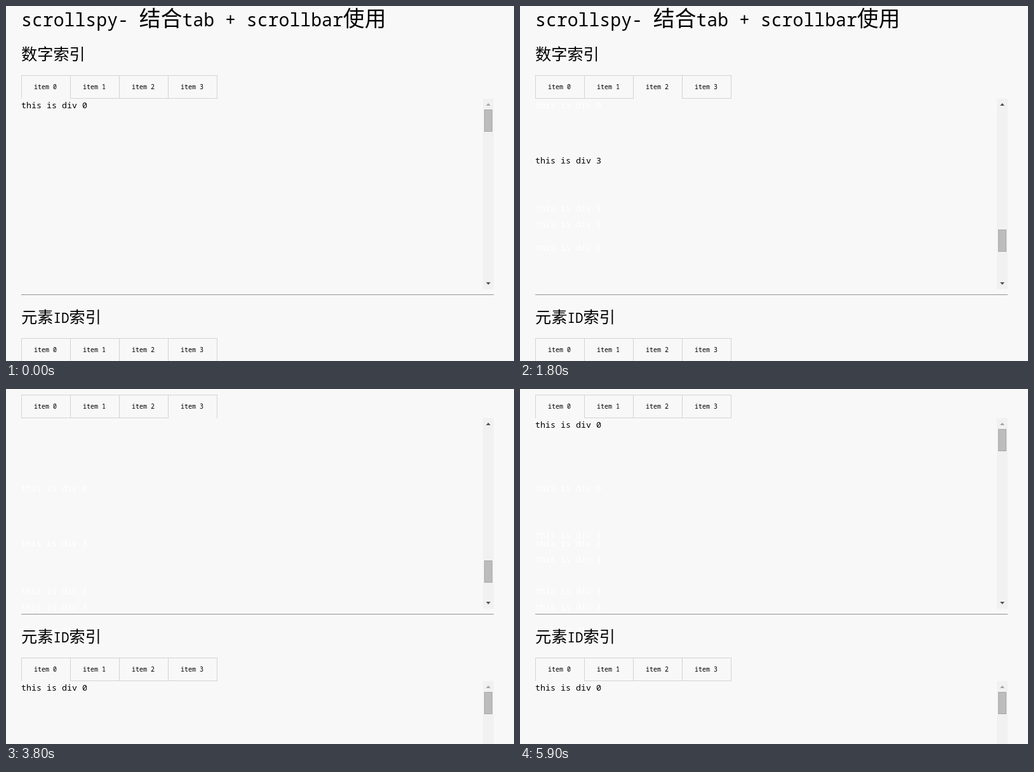
Recreate the animation shown at these times as an HTML page. Size 800 by 559 pixels, loop 8 s.

```html
<!DOCTYPE html>
<html lang="zh-CN">
<head>
<meta charset="utf-8">
<style>
  html, body { margin: 0; width: 100%; height: 100%; overflow: hidden; background: #f8f8f8; }
  svg { display: block; width: 800px; height: 559px; }
  text { white-space: pre; font-family: "Noto Sans Mono", "Liberation Mono", monospace; }
  .cjk { font-family: "Noto Sans CJK SC", "Noto Sans CJK", sans-serif; }
</style>
</head>
<body>
<svg id="stage" viewBox="0 0 800 559">
  <defs><clipPath id="view"><rect x="24" y="146" width="727" height="300"/></clipPath></defs>
</svg>
<script>
const LOOP = 8000;
const ITEM = 562.4;       // height of one scrolled div
const MAX_SCROLL = 1950;
const VIEW_HEIGHT = 300;
const THUMB_TRAVEL = 231;
const TEXT_BASE = 161;    // baseline of the first div when unscrolled
const BG = '#f8f8f8', BORDER = '#d3d3d3';
const items = [0, 1, 2, 3];

const stage = document.getElementById('stage');
const divTop = (i, scroll) => Math.floor(i * ITEM) - scroll;

// Scrolling: each wheel move adds a state; travel past the end moves the page.
const states = [{ time: 0, scroll: 0, page: 0 }];

function wheel(time, distance) {
  const last = states[states.length - 1];
  const wanted = last.scroll + distance;
  const scroll = Math.max(0, Math.min(MAX_SCROLL, wanted));
  states.push({ time, scroll, page: last.page + Math.max(0, wanted - scroll) });
}

// A flick is drawn in two steps, the first one a whole number of notches.
function flick(time, distance) {
  const first = 100 * Math.round(distance / 200);
  wheel(time, first);
  wheel(time + 100, distance - first);
}

for (let i = 0; i < 3; i++) flick(800 + 300 * i, 400 + 100 * i);
flick(1700, 100);
wheel(2200, 200);
flick(2500, 250);
wheel(3800, -200);
for (let i = 0; i < 4; i++) wheel(4200 + 300 * i, 100 * Math.floor(i / 2) - 400);
flick(5400, -200);
flick(5800, -150);

function add(parent, tag, attrs, content) {
  const node = document.createElementNS('http://www.w3.org/2000/svg', tag);
  for (const key in attrs) node.setAttribute(key, attrs[key]);
  if (content) node.textContent = content;
  return parent.appendChild(node);
}

function rect(parent, x, y, width, height, fill) {
  return add(parent, 'rect', { x, y, width, height, fill });
}

// Latin glyphs advance half an em of the CJK size: 0.6 * (size / 1.2).
function label(parent, x, y, size, content, attrs) {
  const node = add(parent, 'text', { x, y, ...attrs });
  for (const run of content.match(/[\u4e00-\u9fff]+|[^\u4e00-\u9fff]+/g)) {
    const cjk = run.charCodeAt(0) > 0x4dff;
    add(node, 'tspan', cjk
      ? { class: 'cjk', 'font-size': size }
      : { 'font-size': size / 1.2 }, run);
  }
  return node;
}

const divLabel = (parent, i, y, fill) =>
  label(parent, 24, y, 16, 'this is div ' + i, { fill });

function section(parent, top, title) {
  const g = add(parent, 'g', { transform: `translate(0 ${top})` });
  label(g, 24, 85, 25.2, title, { 'font-weight': 500 });

  for (const y of [109, 145]) rect(g, 24, y, 309, 1, BORDER);
  const gap = rect(g, 25, 145, 76, 1, BG);
  for (let i = 0; i < 5; i++) rect(g, 24 + 77 * i, 109, 1, 37, BORDER);
  for (const i of items) label(g, 44 + 77 * i, 131, 12, 'item ' + i);

  const view = add(g, 'g', { 'clip-path': 'url(#view)' });
  const divs = items.map(i => divLabel(view, i, TEXT_BASE, '#000'));

  rect(g, 751, 146, 17, VIEW_HEIGHT, '#f1f1f1');
  const up = add(g, 'path', { d: 'M756 157h7l-3.5 -4z' });
  const down = add(g, 'path', { d: 'M756 435h7l-3.5 4z' });
  const thumb = add(g, 'rect', {
    x: 753.5, y: 163.5, width: 12, height: 34, fill: '#bcbcbc', stroke: '#a8a8a8'
  });

  return scroll => {
    gap.setAttribute('x', 25 + 77 * Math.floor(scroll / ITEM));
    divs.forEach((div, i) => div.setAttribute('y', TEXT_BASE + divTop(i, scroll)));
    thumb.setAttribute('y', 163.5 + Math.floor(scroll / MAX_SCROLL * THUMB_TRAVEL));
    up.setAttribute('fill', scroll > 0 ? '#505050' : '#a3a3a3');
    down.setAttribute('fill', scroll < MAX_SCROLL ? '#505050' : '#a3a3a3');
  };
}

// Text that scrolls away leaves a white trace where it stood.
const traces = [];
states.slice(1).forEach(({ time }, n) => {
  const { scroll, page } = states[n];
  for (const i of items) {
    const top = divTop(i, scroll);
    if (top >= 0 && top < VIEW_HEIGHT - 10)
      traces.push({ time, node: divLabel(stage, i, TEXT_BASE + top - page, '#fff') });
  }
});

const page = add(stage, 'g');
label(page, 24, 32, 33.8, 'scrollspy- 结合tab + scrollbar使用');
const scrollFirst = section(page, 0, '数字索引');
rect(page, 24, 454, 744, 1, '#9a9a9a');
rect(page, 24, 455, 744, 1, '#eee');
section(page, 414, '元素ID索引')(0);

function render(time) {
  const state = states.findLast(s => s.time <= time);
  scrollFirst(state.scroll);
  page.setAttribute('transform', `translate(0 ${-state.page})`);
  for (const trace of traces)
    trace.node.setAttribute('visibility', time >= trace.time ? 'visible' : 'hidden');
}

const start = performance.now();
function tick() {
  render((performance.now() - start) % LOOP);
  requestAnimationFrame(tick);
}
tick();
</script>
</body>
</html>
```
